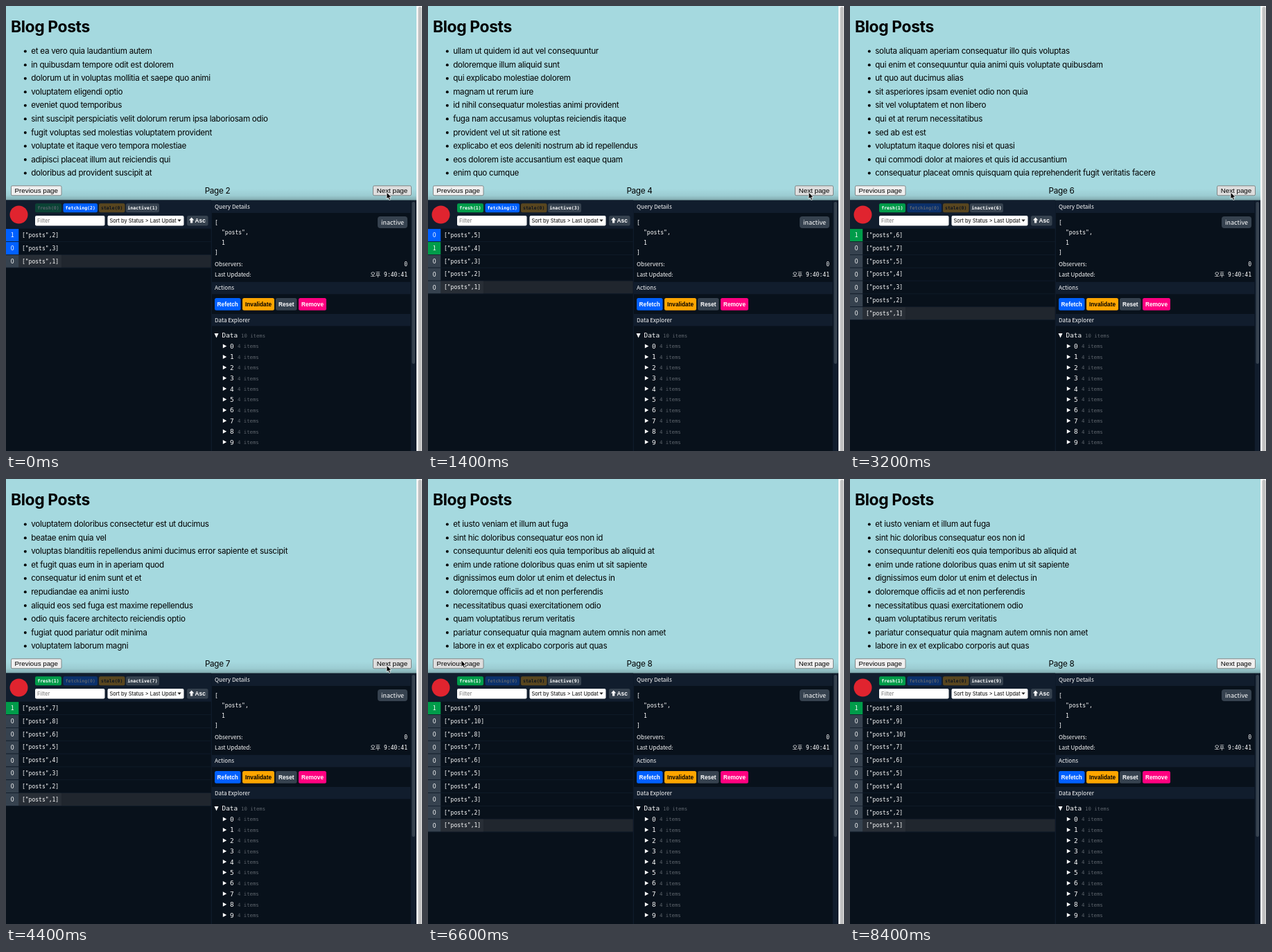
Recreate the animation shown at these times as an HTML page. Size 600x643 px, loop 8500 ms.

```html
<!DOCTYPE html>
<html lang="en">
<head>
<meta charset="utf-8">
<title>Paged list with query inspector</title>
<style>
html, body { margin: 0; width: 100%; height: 100%; overflow: hidden; background: #f8f8f8; }
svg { display: block; position: absolute; left: 0; top: 0; }
text { white-space: pre; fill: #fff; }
.h1 { font: 700 22.9px Inter, sans-serif; letter-spacing: -.4px; fill: #000; }
.body { font: 400 11.65px Inter, sans-serif; letter-spacing: -.26px; fill: #000; }
.btn { font: 400 9.75px "Liberation Sans", Arial, sans-serif; fill: #000; }
.ui { font: 400 8.15px "Noto Sans CJK KR", "Noto Sans", sans-serif; }
.badge { font: 500 9px "Noto Sans CJK KR", "Noto Sans", sans-serif; }
.num { font: 500 8.8px "Noto Sans CJK KR", "Noto Sans", sans-serif; }
.bold { font: 700 8.25px "Liberation Sans", Arial, sans-serif; }
.field { font: 400 7.75px Inter, sans-serif; fill: #000; }
.pick { font: 400 7.4px Inter, sans-serif; fill: #000; }
.mono { font: 400 8.05px "DejaVu Sans Mono", "Noto Sans CJK KR", monospace; }
.tag { font: 700 6.55px "DejaVu Sans Mono", monospace; }
.node { font: 400 9.4px "DejaVu Sans Mono", monospace; }
.info { font: 400 7.3px "DejaVu Sans Mono", monospace; fill: #5d646c; }
.dark { fill: #000; }
.hint { fill: #757575; }
.mid { text-anchor: middle; }
.end { text-anchor: end; }
</style>
</head>
<body>
<svg id="stage" width="600" height="643" viewBox="0 0 600 643">
  <defs>
    <linearGradient id="shade" x1="0" y1="0" x2="0" y2="1">
      <stop offset="0" stop-color="#000" stop-opacity="0"/>
      <stop offset=".6" stop-color="#000" stop-opacity=".06"/>
      <stop offset="1" stop-color="#000" stop-opacity=".22"/>
    </linearGradient>
  </defs>
  <g id="base"></g>
  <g id="posts"></g>
  <g id="buttons"></g>
  <g id="tags"></g>
  <g id="rows"></g>
  <path id="cursor" d="M0 0V9.6L2.2 7.6L3.8 11.2L5.6 10.4L4 6.9H7Z" fill="#000" stroke="#fff" stroke-width=".8"/>
</svg>
<script>
const LOOP = 8500, FETCH = 400;
const BLUE = '#0060ff', GREEN = '#009c4a', GRAY = '#36424f', AMBER = '#ffa500', PINK = '#ff0080';
const BG = '#08111b', ALT = '#111d2d';

const titles = {
  2: `et ea vero quia laudantium autem
in quibusdam tempore odit est dolorem
dolorum ut in voluptas mollitia et saepe quo animi
voluptatem eligendi optio
eveniet quod temporibus
sint suscipit perspiciatis velit dolorum rerum ipsa laboriosam odio
fugit voluptas sed molestias voluptatem provident
voluptate et itaque vero tempora molestiae
adipisci placeat illum aut reiciendis qui
doloribus ad provident suscipit at`,
  3: `asperiores ea ipsam voluptatibus modi minima quia sint
dolor sint quo a velit explicabo quia nam
maxime id vitae nihil numquam
autem hic labore sunt dolores incidunt
rem alias distinctio quo quis
est et quae odit qui non
quasi id et eos tenetur aut quo autem
delectus ullam et corporis nulla voluptas sequi
iusto eius quod necessitatibus culpa ea
a quo magni similique perferendis`,
  4: `ullam ut quidem id aut vel consequuntur
doloremque illum aliquid sunt
qui explicabo molestiae dolorem
magnam ut rerum iure
id nihil consequatur molestias animi provident
fuga nam accusamus voluptas reiciendis itaque
provident vel ut sit ratione est
explicabo et eos deleniti nostrum ab id repellendus
eos dolorem iste accusantium est eaque quam
enim quo cumque`,
  5: `non est facere
commodi ullam sint et excepturi error explicabo praesentium voluptas
eligendi iste nostrum consequuntur adipisci praesentium sit beatae
optio dolor molestias sit
ut numquam possimus omnis eius suscipit laudantium iure
aut quo modi neque nostrum ducimus
quibusdam cumque rem aut deserunt
ut voluptatem illum ea doloribus itaque eos
laborum non sunt aut ut assumenda perspiciatis voluptas
repellendus qui recusandae incidunt voluptates tenetur qui omnis exercitationem`,
  6: `soluta aliquam aperiam consequatur illo quis voluptas
qui enim et consequuntur quia animi quis voluptate quibusdam
ut quo aut ducimus alias
sit asperiores ipsam eveniet odio non quia
sit vel voluptatem et non libero
qui et at rerum necessitatibus
sed ab est est
voluptatum itaque dolores nisi et quasi
qui commodi dolor at maiores et quis id accusantium
consequatur placeat omnis quisquam quia reprehenderit fugit veritatis facere`,
  7: `voluptatem doloribus consectetur est ut ducimus
beatae enim quia vel
voluptas blanditiis repellendus animi ducimus error sapiente et suscipit
et fugit quas eum in in aperiam quod
consequatur id enim sunt et et
repudiandae ea animi iusto
aliquid eos sed fuga est maxime repellendus
odio quis facere architecto reiciendis optio
fugiat quod pariatur odit minima
voluptatem laborum magni`,
  8: `et iusto veniam et illum aut fuga
sint hic doloribus consequatur eos non id
consequuntur deleniti eos quia temporibus ab aliquid at
enim unde ratione doloribus quas enim ut sit sapiente
dignissimos eum dolor ut enim et delectus in
doloremque officiis ad et non perferendis
necessitatibus quasi exercitationem odio
quam voluptatibus rerum veritatis
pariatur consequatur quia magnam autem omnis non amet
labore in ex et explicabo corporis aut quas`,
  9: `tempora rem veritatis voluptas quo dolores vero
laudantium voluptate suscipit sunt enim enim
odit et voluptates doloribus alias odio et
optio ipsam molestias necessitatibus occaecati facilis veritatis dolores aut
dolore veritatis porro provident adipisci blanditiis et sunt
placeat quia et porro iste
nostrum quis quasi placeat
sapiente omnis fugit eos
sint soluta et vel magnam aut ut sed qui
ad iusto omnis odit dolor voluptatibus`
};

// [time, page] for each click
const clicks = [[0, 2], [500, 3], [1300, 4], [2100, 5], [2700, 6], [3900, 7], [4700, 8], [5500, 9], [6600, 8]];
const BACK = 6600, LAG = 100;

const $ = id => document.getElementById(id);
const esc = s => String(s).replace(/&/g, '&amp;').replace(/</g, '&lt;').replace(/>/g, '&gt;');
const text = (x, y, s, cls) => `<text x="${x}" y="${y}" class="${cls}">${esc(s)}</text>`;
const rect = (x, y, w, h, fill, r = 0, more = '') =>
  `<rect x="${x}" y="${y}" width="${w}" height="${h}" rx="${r}" fill="${fill}" ${more}/>`;
const shape = (d, fill) => `<path d="${d}" fill="${fill}"/>`;

function drawBase() {
  const strip = (y, h, label, base) => rect(297, y, 286.5, h, ALT) + text(301, base, label, 'ui');
  const action = (x, w, label, fill, cls = '') =>
    rect(x, 422, w, 17.7, fill, 2.5) + text(x + w / 2, 433.8, label, 'bold mid ' + cls);
  let s = rect(0, 0, 592, 643, '#a5d9df') + rect(594.5, 1, 5, 660, '#c1c1c1', 2.5)
    + text(7, 37.5, 'Blog Posts', 'h1')
    + rect(0, 264, 592, 16.5, 'url(#shade)')
    + rect(0, 280.5, 592, 363, BG)
    + rect(0, 280.5, 296, 41.2, ALT)
    + '<circle cx="18.5" cy="301.5" r="13" fill="#e0242f"/>'
    + rect(42, 303, 100.5, 14.5, '#fff', 2) + text(45, 313, 'Filter', 'field hint')
    + rect(146.5, 303, 110, 14.5, '#fff', 2) + text(149.5, 312.8, 'Sort by Status > Last Updat', 'pick')
    + shape('M247.3 308.4h5.4l-2.7 3.4z', '#222')
    + rect(261, 303, 30.5, 14.5, GRAY, 2.5)
    + shape('M267.6 305.6l3.7 4h-2.1v4h-3.2v-4h-2.1z', '#fff') + text(272.6, 313, 'Asc', 'bold')
    + rect(295.7, 281, 1.2, 362, ALT)
    + strip(281, 18, 'Query Details', 293) + strip(398.7, 17.6, 'Actions', 410.3)
    + strip(445, 17.4, 'Data Explorer', 456.8)
    + text(301, 315.8, '[', 'mono') + text(311, 330, '"posts",', 'mono')
    + text(311, 344.5, '1', 'mono') + text(301, 359, ']', 'mono')
    + rect(536, 304, 43, 17, GRAY, 4) + text(557.5, 315.7, 'inactive', 'badge mid')
    + text(301, 376, 'Observers:', 'ui') + text(579, 376, '0', 'mono end')
    + text(301, 390.8, 'Last Updated:', 'ui') + text(579, 390.8, '오후 9:40:41', 'mono end')
    + action(301, 37.5, 'Refetch', BLUE) + action(341, 46, 'Invalidate', AMBER, 'dark')
    + action(389, 30.5, 'Reset', GRAY) + action(422, 40, 'Remove', PINK)
    + shape('M300.5 473h6l-3 6.4z', '#fff') + text(311.5, 479.4, 'Data', 'node')
    + text(339, 479, '10 items', 'info')
    + rect(583.8, 281, 8.2, 362, ALT) + rect(585.5, 283, 4.5, 234, GRAY, 2.2);
  for (let i = 0; i < 10; i++) {
    const y = 491.5 + 15.4 * i;
    s += shape(`M312.8 ${y - 3}v6l5.4-3z`, '#fff') + text(323, y + 3.4, i, 'node')
      + text(334, y + 2.8, '4 items', 'info');
  }
  $('base').innerHTML = s;
}

function drawPosts(page) {
  const lines = titles[page].split('\n').map((line, i) => {
    const y = 65.2 + 19.55 * i;
    return `<circle cx="27.8" cy="${y + .4}" r="2" fill="#000"/>` + text(36.2, y + 4, line, 'body');
  });
  $('posts').innerHTML = lines.join('') + text(305, 270.7, 'Page ' + page, 'body mid');
}

function drawButtons(hover) {
  const button = (x, w, label, on) =>
    rect(x, 259.8, w, 14, on ? '#dedede' : '#efefef', 1.8, 'stroke="#6f6f6f" stroke-width=".8"')
    + text(x + w / 2, 270.2, label, 'btn mid');
  $('buttons').innerHTML = button(7.5, 72.5, 'Previous page', hover === 'prev')
    + button(529.5, 55, 'Next page', hover === 'next');
}

// rows are [page, state], states: fetching, fresh, inactive
function queryRows(page, back, busy, first) {
  const top = back ? 10 : page + 1;
  const row = (p, s) => [p, s];
  let head;
  if (!busy) head = [row(page, 'fresh'), row(page + 1, 'inactive')];
  else if (first) head = [row(page, 'fetching'), row(page + 1, 'fetching')];
  else if (back) head = [row(page + 1, 'fetching'), row(page, 'fetching')];
  else head = [row(page + 1, 'fetching'), row(page, 'fresh')];
  for (let p = top; p > 0; p--) if (p !== page && p !== page + 1) head.push(row(p, 'inactive'));
  return head;
}

function drawQueries(rows, page) {
  const fills = { fetching: BLUE, fresh: GREEN, inactive: GRAY };
  const count = s => rows.filter(r => r[1] === s).length;
  const tag = (x, w, name, fill, cls = '') => {
    const n = count(name);
    return `<g opacity="${n ? 1 : .3}">` + rect(x, 285.2, w, 13, fill, 2.2)
      + text(x + w / 2, 294, `${name}(${n})`, 'tag mid ' + cls) + '</g>';
  };
  $('tags').innerHTML = tag(42, 38, 'fresh', GREEN) + tag(82.5, 49.5, 'fetching', BLUE)
    + tag(134, 37.5, 'stale', AMBER, 'dark') + tag(173, 48, 'inactive', GRAY);
  $('rows').innerHTML = rows.map(([p, state], i) => {
    const y = 322.1 + 18.83 * i;
    const picked = p === 1
      ? rect(18.3, y, 277.4, 18.1, '#20262e') + rect(18.3, y, 61.5, 18.1, '#282e36') : '';
    return picked + rect(0, y, 18.3, 18.1, fills[state]) + rect(0, y + 18.1, 295.7, .73, ALT)
      + text(9.2, y + 12.1, p === page ? 1 : 0, 'num mid')
      + text(22.9, y + 11.9, `["posts",${p}]`, 'mono');
  }).join('');
}

const ease = k => k * k * (3 - 2 * k);
function cursorAt(t) {
  const k = ease(Math.min(1, Math.max(0, (t - 6050) / 400)));
  return { x: 549 - 501 * k, y: 269.3 - 7.3 * k, shown: t < 7500 };
}

const seen = {};
function once(name, key, draw) {
  if (seen[name] === key) return;
  seen[name] = key;
  draw();
}

const clickAt = t => clicks.filter(c => c[0] <= t).pop();

function render(t) {
  const page = clickAt(t)[1];
  once('posts', page, () => drawPosts(page));

  const [since, current] = clickAt(t >= BACK && t < BACK + LAG ? BACK - 1 : t);
  const back = since === BACK, first = since === 0;
  const busy = t - since < (first ? 300 : back ? FETCH + LAG : FETCH);
  once('queries', since + '/' + busy, () => drawQueries(queryRows(current, back, busy, first), current));

  const c = cursorAt(t);
  const hover = !c.shown ? '' : c.x > 529 ? 'next' : c.x < 80 ? 'prev' : '';
  once('buttons', hover, () => drawButtons(hover));
  $('cursor').setAttribute('transform', `translate(${c.x} ${c.y})`);
  $('cursor').style.display = c.shown ? '' : 'none';
}

drawBase();
const start = performance.now();
function tick() {
  render((performance.now() - start) % LOOP);
  requestAnimationFrame(tick);
}
tick();
</script>
</body>
</html>
```
